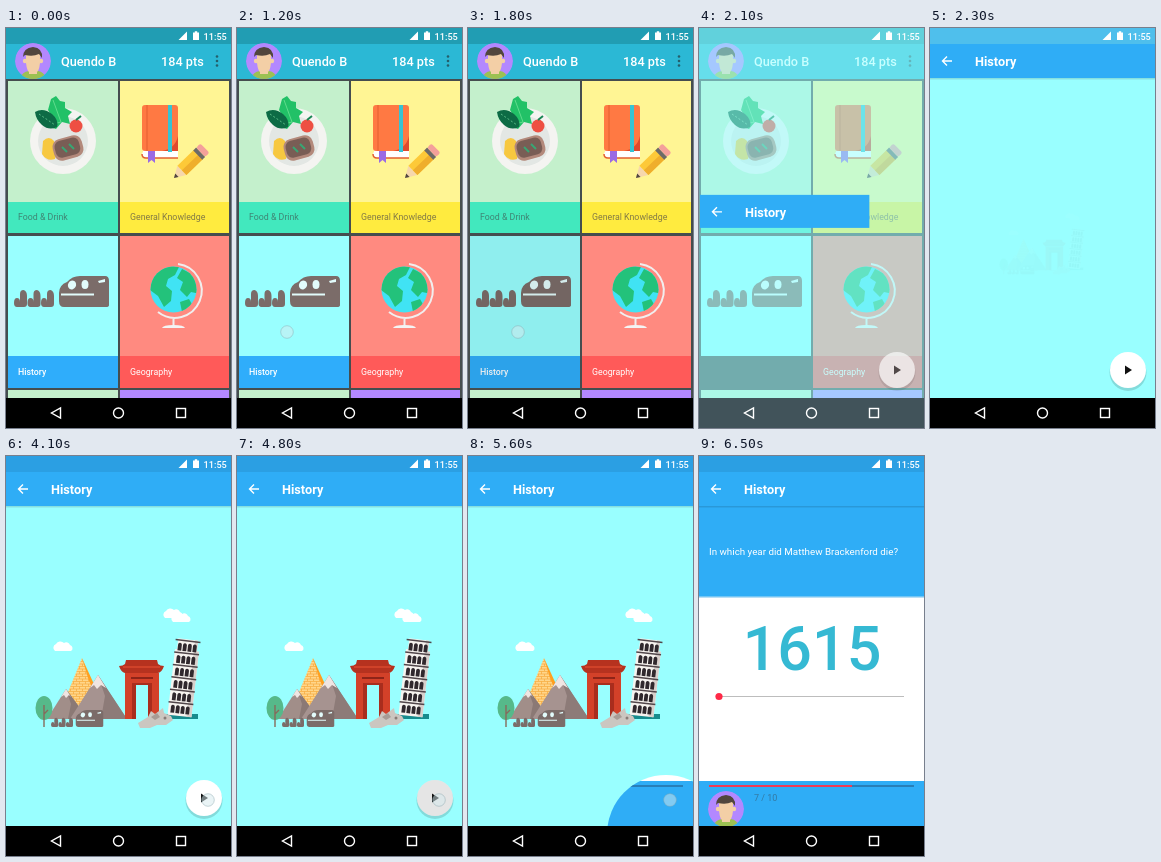
Animation of 225 by 400 pixels, one loop 7300 ms. Source, as an HTML page:

```html
<!DOCTYPE html>
<html lang="en">
<head>
<meta charset="utf-8">
<title>Quiz app</title>
<style>
html, body { margin: 0; height: 100%; overflow: hidden; background: #000; }
svg { display: block; width: 100%; height: 100%; font-family: Roboto, "Open Sans", sans-serif; }
.title { font-size: 12.7px; font-weight: 500; fill: #fff; }
.label { font-size: 8.8px; }
.white { fill: #fff; }
.line { fill: none; stroke: #fff; stroke-width: 1.4; }
</style>
</head>
<body>
<svg viewBox="0 0 225 400">
<defs>
  <clipPath id="tileClip"><rect x="2" y="208" width="110" height="152"/></clipPath>
  <clipPath id="fabClip"><circle cx="198" cy="342" r="18"/></clipPath>
  <clipPath id="contentClip"><rect y="50" width="225" height="320"/></clipPath>
  <clipPath id="revealClip"><circle id="reveal" cx="198" cy="378" r="0"/></clipPath>
  <clipPath id="faceClip"><circle r="18"/></clipPath>
  <clipPath id="globeClip"><circle cx="167.500" cy="261.500" r="23"/></clipPath>
  <pattern id="bricks" width="6" height="5" patternUnits="userSpaceOnUse">
    <rect width="6" height="5" fill="#ffd68a"/>
    <path d="M0 .5H6M0 3H6M1.5 .5V3M4.5 3V5.5" stroke="#f7a93b" stroke-width=".7"/>
  </pattern>
  <g id="avatar" clip-path="url(#faceClip)">
    <circle r="18" fill="#b388ff"/>
    <path d="M-13 19Q-12 11 -4 10H5Q12 11 13 19Z" fill="#9cc152"/>
    <path d="M-7 -8H7V2Q6 10 4 11V13H-4V11Q-6 10 -7 2Z" fill="#f3cfa6"/>
    <circle cx="-8" cy="0" r="2.200" fill="#f3cfa6"/><circle cx="8" cy="0" r="2.200" fill="#f3cfa6"/>
    <path d="M-10 -4Q-10 -13 0 -14Q10 -13 9 -3L6 -7Q0 -4 -8 -6Z" fill="#51463d"/>
  </g>
  <path id="claw" d="M8 275Q8 270 11 270Q14 270 14 274V266Q14 262 17.500 262Q21 263 21 268V276Q21 279 18 279H11Q8 279 8 275Z"/>
  <g id="dino" fill="#7b6c69">
    <use href="#claw"/><use href="#claw" x="13.5"/><use href="#claw" x="27"/>
    <path d="M53 265Q53 257 61 254Q66 248 74 248H99Q103 248 103 253V268H53Z"/>
    <path d="M53 268H103V277Q103 279 100 279H58Q53 279 53 273Z"/>
    <g fill="#e2fcfc">
      <ellipse cx="66" cy="257" rx="4" ry="4.500" transform="rotate(30 66 257)"/>
      <ellipse cx="79" cy="256.500" rx="3.500" ry="4.500"/>
      <path d="M92 253L99 251V254L93 255ZM55 265.500H88V267.500H55Z"/>
    </g>
  </g>
  <path id="cloud" d="M2 10A4 4 0 0 1 3 3A5 5 0 0 1 11 2A4 4 0 0 1 17 4A3.3 3.3 0 0 1 18 10Z" fill="#fff"/>
</defs>

<g id="home">
  <rect width="225" height="370" fill="#454d4f"/>
  <rect width="225" height="51" fill="#2bb8d5"/>
  <rect width="225" height="16" fill="#219db3"/>
  <use href="#avatar" x="27" y="33"/>
  <text class="title" x="55" y="38">Quendo B</text>
  <text class="title" x="155" y="38">184 pts</text>
  <g fill="#245f6c"><circle cx="211" cy="28.5" r="1.3"/><circle cx="211" cy="33" r="1.3"/><circle cx="211" cy="37.5" r="1.3"/></g>

  <path d="M2 53H112V174H2ZM2 362H112V370H2Z" fill="#c4f0cc"/>
  <rect x="114" y="53" width="109" height="121" fill="#fff594"/>
  <rect x="2" y="208" width="110" height="120" fill="#99ffff"/>
  <rect x="114" y="208" width="109" height="120" fill="#ff8a80"/>
  <rect x="114" y="362" width="109" height="8" fill="#b388ff"/>
  <rect x="2" y="174" width="110" height="31" fill="#42e8be"/>
  <rect x="114" y="174" width="109" height="31" fill="#ffeb3f"/>
  <rect x="114" y="328" width="109" height="32" fill="#ff5a59"/>
  <g class="label">
    <text x="12" y="192" fill="#3f8675">Food &amp; Drink</text>
    <text x="124" y="192" fill="#837a45">General Knowledge</text>
    <text x="124" y="347" class="white">Geography</text>
  </g>
  <g id="tileLabel">
    <rect x="2" y="328" width="110" height="32" fill="#2fadfb"/>
    <text class="label white" x="12" y="347" font-weight="500">History</text>
  </g>

  <!-- food -->
  <circle cx="57" cy="113" r="33" fill="#f4f4f1"/><circle cx="57" cy="113" r="25" fill="#e3e7e4"/>
  <path d="M45 71L50 68L54 73L59 74L59 80L66 84L62 88L64 96L56 94L50 101L41 98L47 90L42 82Z" fill="#22c167"/>
  <path d="M47 72L55 94L44 97" stroke="#5fdc8c" fill="none"/>
  <path d="M29 84Q37 79 46 86Q53 92 51 99Q43 103 36 97Q30 92 29 84Z" fill="#0d6b45"/>
  <path d="M33 86L49 97" stroke="#58bb86" stroke-dasharray="2 2"/>
  <circle cx="70" cy="98" r="6.500" fill="#ee4f43"/><path d="M70 92L75 88" stroke="#198654" stroke-width="2"/>
  <path d="M37 113Q43 107 48 113Q52 121 49 131Q41 134 36 126Z" fill="#f7c840"/>
  <g transform="rotate(-15 62 120)">
    <rect x="47" y="109" width="30" height="22" rx="8" fill="#b3897b"/>
    <rect x="49" y="111" width="25" height="17" rx="6" fill="#795d55"/>
  </g>
  <path d="M56 119l5 5M63 116l5 5" stroke="#39a674" stroke-width="2"/>

  <!-- book and pencil -->
  <path d="M138 121H172V130H139Q136 130 136 126Z" fill="#fff"/>
  <rect x="136" y="77" width="36" height="46" rx="3" fill="#ff7943"/>
  <path d="M141 77V123" stroke="#e35f31"/>
  <path d="M172 108V123H156Q169 121 172 108Z" fill="#e0492c"/>
  <rect x="162" y="77" width="4" height="47" fill="#36c3d3"/>
  <path d="M136 126Q136 130 140 130H172" fill="none" stroke="#e35f31" stroke-width="1.500"/>
  <path d="M142 123H149V135L145.500 132L142 135Z" fill="#9b6be4"/>
  <g transform="translate(168 150) rotate(-44)">
    <path d="M0 0L11 -6.500V6.500Z" fill="#f6d7ad"/><path d="M0 0L4 -2.400V2.400Z" fill="#51463d"/>
    <path d="M11 -6.500H34V6.500H11Z" fill="#fdc938"/><path d="M11 0H34V6.500H11Z" fill="#efae2c"/>
    <rect x="33" y="-6.500" width="4" height="13" fill="#6d6a68"/><rect x="37" y="-6.500" width="6" height="13" rx="2" fill="#f4a09a"/>
  </g>

  <use href="#dino"/>

  <!-- globe -->
  <path d="M172 236A27 27 0 1 1 152 284M167.500 289V298" fill="none" stroke="#f1eeee" stroke-width="2"/>
  <path d="M156 300Q157 297 167.500 297Q178 297 179 300Z" fill="#f4f4f4"/>
  <circle cx="167.500" cy="261.500" r="23" fill="#40e3f4"/>
  <g clip-path="url(#globeClip)" fill="#23c27b">
    <path d="M145 248L157 237L173 239L169 247L162 251L160 258L166 263L165 273L158 279L152 268L144 262Z"/>
    <path d="M176 241L194 250V266L185 264L181 269L174 262L177 254L171 250Z"/>
    <path d="M174 274L183 271L187 278L176 284Z"/>
  </g>
  <g clip-path="url(#tileClip)"><circle id="tileRipple" cx="50" cy="304" r="0"/></g>
</g>

<g id="detail">
  <rect id="scrim" width="225" height="370" fill="#99ffff"/>
  <g id="scene">
    <use href="#cloud" x="47" y="185"/>
    <use href="#cloud" x="157" y="152"/><use href="#cloud" x="165" y="156"/>
    <path d="M76 202L51 263H99Z" fill="url(#bricks)"/><path d="M76 202L104 263H99L82 222Z" fill="#ff9f1f"/>
    <path d="M60 233L41 263H82Z" fill="#a18e89"/><path d="M60 233L65 248L62 263H82Z" fill="#8b7975"/>
    <path d="M92 219L64 263H121Z" fill="#a69390"/><path d="M92 219L99 240L95 263H121Z" fill="#8d7b78"/>
    <path d="M92 219L84 232L88 229L91 233L95 229L100 232Z" fill="#efe5e2"/>
    <path d="M60 233L55 241L58 239L60 242L63 239L65 241Z" fill="#efe5e2"/>
    <ellipse cx="38" cy="252" rx="8.500" ry="12" fill="#56b98a"/>
    <path d="M38 249V271M38 258L42 254" stroke="#866b5c" stroke-width="1.400"/>
    <path d="M120 204H151L152 208Q154 210 158 210Q156 216 152 217H119Q115 216 113 210Q117 210 119 208Z" fill="#b6321f"/>
    <path d="M117 211H154" stroke="#d9472d" stroke-width="1.500"/>
    <path d="M119 217H153V263H119Z" fill="#d34129"/>
    <path d="M126 227H146V263H126Z" fill="#a92d1d"/><path d="M130 229H142V263H130Z" fill="#99ffff"/>
    <path d="M125 222H147" stroke="#8e2418" stroke-width="2"/>
    <rect x="160" y="258" width="32" height="5" fill="#168b8d"/>
    <g id="tower" transform="translate(173.500 260) rotate(6.500)"></g>
    <path d="M132 267L142 261L145 255L149 258L157 252L158 257L165 260L167 264L160 269L151 269L144 272H134Z" fill="#cbc6c0"/>
    <path d="M145 261L151 257L154 261L149 264Z" fill="#a79c95"/><circle cx="159" cy="262" r="1.500" fill="#887d78"/>
    <use href="#dino" transform="translate(40.600 117.600) scale(.55)"/>
  </g>
  <rect id="status" width="225" height="16" fill="#2b9fe3"/>
  <g id="fab">
    <circle cx="198" cy="344.500" r="18.500" opacity=".14"/>
    <circle cx="198" cy="342" r="18" fill="#fff"/>
    <g clip-path="url(#fabClip)"><circle id="fabRipple" cx="202" cy="344" r="0"/></g>
    <path d="M195 337.500L202 342L195 346.500Z" fill="#111"/>
  </g>
  <g clip-path="url(#contentClip)"><g clip-path="url(#revealClip)">
    <rect y="50" width="225" height="275" fill="#fff"/>
    <rect y="50" width="225" height="92" fill="#b9dff5"/>
    <path d="M0 50H225V140.500H0ZM0 325H225V370H0Z" fill="#2fadf6"/>
    <text x="10" y="99" font-size="9.800" class="white">In which year did Matthew Brackenford die?</text>
    <text x="113" y="214" font-size="61" font-weight="500" text-anchor="middle" fill="#35b9d3">1615</text>
    <path d="M20 240.500H205" stroke="#bdbdbd"/><circle cx="20" cy="240.500" r="3.600" fill="#ff2947"/>
    <path d="M10 330H215" stroke="#287fb8" stroke-width="2"/><path d="M10 330H153" stroke="#f13b55" stroke-width="2"/>
    <text x="55" y="345" font-size="9" fill="#3379a3">7 / 10</text>
    <use href="#avatar" x="27" y="353"/>
  </g></g>
  <rect id="bar" fill="#2fadf6"/>
  <rect id="barShadow" y="50" width="225" height="1.500" opacity=".12"/>
  <g id="barText">
    <path class="line" d="M22 33H13M17 28.500L12.500 33L17 37.500"/>
    <text class="title" x="45" y="38" font-size="12.400" style="font-weight: 700">History</text>
  </g>
</g>

<circle id="touch" r="6.300" fill="#d6eaee" fill-opacity=".5" stroke="#8ba6ad" stroke-opacity=".45"/>
<path d="M181 3.500V12H172.500Z" class="white"/>
<path d="M187 4.500H188.800V3.300H191.200V4.500H193V12H187Z" class="white"/>
<text x="197.500" y="12" font-size="9.200" font-weight="500" class="white">11:55</text>
<rect y="370" width="225" height="30"/>
<rect id="navScrim" y="370" width="225" height="30" fill="#99c4d4"/>
<g class="line">
  <path d="M54.500 380V390L45.500 385Z"/><circle cx="112.500" cy="385" r="5"/><rect x="170.500" y="380.500" width="9" height="9"/>
</g>
</svg>
<script>
const LOOP = 7300, STEP = 100;
const $ = id => document.getElementById(id);
const set = (id, attrs) => { for (const k in attrs) $(id).setAttribute(k, attrs[k]); };
const part = (t, from, to) => Math.min(1, Math.max(0, (t - from) / (to - from)));
const mix = (a, b, p) => a + (b - a) * p;

// cubic-bezier(.4, 0, x2, 1), solved by bisection
function ease(p, x2) {
  let lo = 0, hi = 1, s = p;
  for (let i = 0; i < 24; i++) {
    s = (lo + hi) / 2;
    const x = 1.2 * s * (1 - s) ** 2 + 3 * x2 * s * s * (1 - s) + s ** 3;
    if (x < p) lo = s; else hi = s;
  }
  return 3 * s * s * (1 - s) + s ** 3;
}
const settle = p => ease(p, .2);
const depart = p => ease(p, 1);

function buildTower() {
  let parts = '<path d="M-12 0V-66H-10V-77H10V-66H12V0Z" fill="#f7f3ef"/>' +
    '<path d="M7 0V-77H10V-66H12V0Z" fill="#d8cfcb"/>';
  for (let row = 0; row < 6; row++) {
    const y = -2.5 - row * 12.5;
    parts += `<path d="M-12.500 ${y - 10.5}H12.500" stroke="#51464a" stroke-width="1.500"/>`;
    for (let x = -9.5; x < 9; x += 5) {
      parts += `<path d="M${x} ${y}V${y - 6}a1.900 1.900 0 0 1 3.800 0V${y}Z" fill="#30282d"/>`;
    }
  }
  $('tower').innerHTML = parts;
}

function draw(t) {
  const opened = t >= 2000;
  set('detail', { visibility: opened ? 'visible' : 'hidden' });
  set('tileLabel', { visibility: opened ? 'hidden' : 'visible' });

  const tap = part(t, 1200, 1800);
  set('tileRipple', { r: 120 * tap, opacity: .1 * (1 - part(t, 1700, 2000)) });

  // The tile's label grows into the toolbar.
  const p = settle(part(t, 1993, 2293));
  const y = mix(328, 16, p);
  set('bar', { x: mix(2, 0, p), y, width: mix(110, 225, p), height: mix(32, 34, p) });
  set('barText', { transform: `translate(${mix(2, 0, p)} ${y - 16})` });
  set('barShadow', { visibility: p > .99 ? 'visible' : 'hidden' });
  set('scrim', { opacity: part(t, 1950, 2230) });
  set('status', { opacity: part(t, 2100, 2400) });
  set('navScrim', { opacity: 1.7 * p * (1 - p) });
  set('fab', { opacity: part(t, 1950, 2180) });

  const show = settle(part(t, 2250, 2700)), size = mix(.5, 1, show);
  set('scene', {
    opacity: show,
    transform: `translate(112 220) scale(${size}) translate(-112 -220)`
  });

  set('fabRipple', { r: 24 * part(t, 4100, 4800), opacity: .1 * (1 - part(t, 4800, 5200)) });
  set('reveal', { r: t < 5460 ? 0 : mix(18, 400, depart(part(t, 5458, 6000))) });

  const onTile = t >= 1200 && t < 1900, onFab = t >= 4100 && t < 5700;
  set('touch', {
    cx: onFab ? 202 : 50, cy: onFab ? 344 : 304,
    visibility: onTile || onFab ? 'visible' : 'hidden'
  });
}

function frame() {
  draw(Math.floor(performance.now() % LOOP / STEP) * STEP);
  requestAnimationFrame(frame);
}
buildTower();
frame();
</script>
</body>
</html>
```
